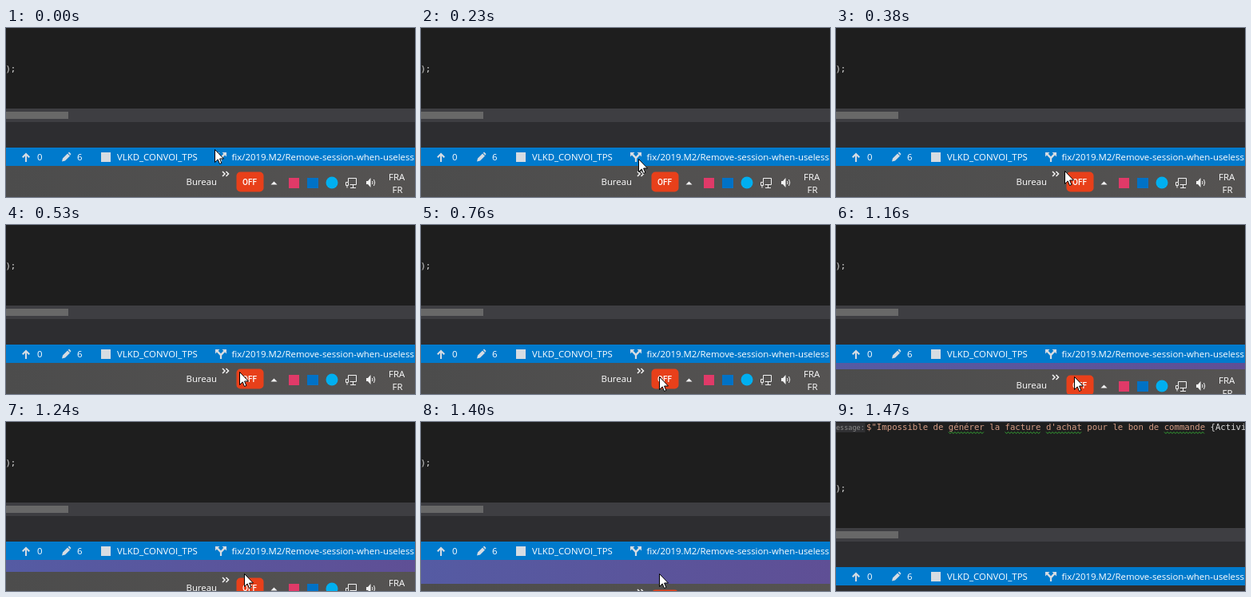
These frames come from a looping animation (512 by 212 pixels, 2330 ms). An HTML page:

```html
<!DOCTYPE html>
<html lang="fr">
<head>
<meta charset="utf-8">
<title>Masquage de la barre des tâches</title>
<style>
  html, body { margin: 0; width: 100%; height: 100%; overflow: hidden; background: #2d2d30; }
  svg { display: block; width: 100vw; height: 100vh; }
  text { font: 11.4px "Open Sans", "Noto Sans", sans-serif; fill: #fff; white-space: pre; }
  .code { font: 10.68px "DejaVu Sans Mono", "Noto Sans Mono", monospace; fill: #dcdcdc; }
  .hint { font-size: 8.5px; fill: #8a8a8a; }
  .off { font: 500 10px Roboto, sans-serif; text-anchor: middle; }
  .string { fill: #d69d85; }
  .line { fill: none; stroke: #f2f2f2; }
</style>
</head>
<body>
<svg viewBox="0 0 512 212">
  <defs>
    <linearGradient id="wall">
      <stop stop-color="#555ba3"/>
      <stop offset="1" stop-color="#5f4f95"/>
    </linearGradient>
    <linearGradient id="bar">
      <stop stop-color="#4c4c4c"/>
      <stop offset="1" stop-color="#555352"/>
    </linearGradient>
  </defs>

  <g id="editor">
    <rect y="-40" width="512" height="141" fill="#1e1e1e"/>
    <g id="message">
      <rect y="-31" width="36.5" height="12" fill="#303033"/>
      <text class="code hint" x="0" y="-22">essage:</text>
      <text class="code string" x="38" y="-22">$"Impossible de générer la facture d'achat pour le bon de commande <tspan fill="#dcdcdc">{Activi</tspan></text>
      <path id="waves" fill="none" stroke="#35a835"/>
    </g>
    <text class="code" x="-0.6" y="55">);</text>
    <rect y="101" width="512" height="17" fill="#3e3e42"/>
    <rect y="105" width="78" height="9" fill="#686868"/>
    <rect y="118" width="512" height="32" fill="#2d2d30"/>
    <rect y="150" width="512" height="23" fill="#007acc"/>

    <g fill="#d6dce2">
      <path d="M25 156.500l5 5-1.500 1.500-2.500-2.400V168h-2v-7.400l-2.500 2.400-1.500-1.500z"/>
      <path d="M70 167.500l1-4 6-6 3 3-6 6zM77.800 156.700l1.200-1.200 2.500 2.500-1.200 1.700z"/>
      <rect x="119" y="156" width="12" height="12"/>
      <path d="M262 156h5.500l-1.800 1.800 3.300 3.400 3.300-3.400-1.800-1.800h5.500v5.500l-1.900-1.900-4 4.100v4.300h-2.200v-4.300l-4-4.100-1.900 1.900z"/>
    </g>
    <text x="39" y="166">0</text>
    <text x="89" y="166">6</text>
    <text x="139" y="166">VLKD_CONVOI_TPS</text>
    <text x="282.5" y="166">fix/2019.M2/Remove-session-when-useless</text>
  </g>

  <g id="desktop">
    <rect y="173" width="512" height="39" fill="url(#wall)"/>
    <g id="taskbar">
      <rect y="173" width="512" height="41" fill="url(#bar)"/>
      <text x="225.5" y="197">Bureau</text>
      <path class="line" stroke-width="1.5" d="M271 180l3 3-3 3M275.500 180l3 3-3 3"/>
      <rect x="288.5" y="180.500" width="34" height="25" rx="5" fill="#e8401a"/>
      <text class="off" x="305" y="197">OFF</text>
      <path fill="#f2f2f2" d="M331.500 196.500l4-4 4 4z"/>
      <rect x="354" y="188" width="13" height="13" fill="#e03a68"/>
      <rect x="377" y="188" width="14" height="13" fill="#0072c6"/>
      <circle cx="408" cy="194" r="7.500" fill="#00aff0"/>
      <path class="line" d="M428.500 193v-4.500h10v8h-8M434.500 197v3M431 200.500h7M425.500 193.500h3v4h-3zM427 197.500v3"/>
      <path fill="#f2f2f2" d="M451 192h2l3.500-4v12l-3.500-4h-2z"/>
      <path class="line" d="M458.500 192q1.200 2 0 4M460.500 190q2.500 4 0 8"/>
      <text x="479" y="191">FRA</text>
      <text x="483.500" y="207">FR</text>
    </g>
    <circle id="click" cx="298" cy="190" r="12" fill="#ff0" fill-opacity=".47"/>
    <path id="cursor" fill="#fff" stroke="#000" stroke-width="1" stroke-linejoin="round"
      d="M.5.5v16l3.700-3.600 2.300 5.600 2.400-1-2.300-5.500h4.900z"/>
  </g>
</svg>
<script>
  const LOOP = 2330, CLICK = 930, SLIDE = 1080, RESIZED = 1470;
  const ticks = [0, 70, 150, 230, 300, 380, 460, 530, 610, 690, 760, 930, 1080, 1160, 1240, 1320, 1400, 1470];
  // Pointer path: time, x, y
  const path = [[0, 261, 152], [150, 266, 157], [230, 272, 164], [300, 280, 172],
    [380, 286, 179], [530, 292, 184], [760, 298, 190]];
  const el = id => document.getElementById(id);
  const show = (id, on) => el(id).setAttribute("visibility", on ? "inherit" : "hidden");
  const move = (id, x, y) => el(id).setAttribute("transform", `translate(${x} ${y})`);

  function wave(col, length) {
    const start = 38 + col * 6.43;
    let d = "";
    for (let i = 0; i * 2 <= length * 6.43; i++)
      d += `${i ? "L" : "M"}${start + i * 2} ${i % 2 ? -17.5 : -19.5}`;
    return d;
  }
  el("waves").setAttribute("d", [[16, 7], [27, 7], [35, 7], [58, 8]].map(w => wave(...w)).join(""));

  function pointer(t) {
    const next = path.findIndex(p => p[0] > t);
    if (next < 0) return path[path.length - 1].slice(1);
    const a = path[next - 1], b = path[next];
    const k = (t - a[0]) / (b[0] - a[0]);
    return [1, 2].map(i => Math.round(a[i] + (b[i] - a[i]) * k));
  }

  function draw(time) {
    const t = ticks.filter(s => s <= time).pop();
    const resized = t >= RESIZED;
    move("editor", 0, resized ? 32 : 0);
    show("message", resized);
    show("desktop", !resized);
    show("click", t === CLICK);
    move("taskbar", 0, Math.round(Math.max(0, t - SLIDE) * 0.095));
    move("cursor", ...pointer(t));
  }

  const begin = performance.now();
  function tick() {
    draw((performance.now() - begin) % LOOP);
    requestAnimationFrame(tick);
  }
  tick();
</script>
</body>
</html>
```
